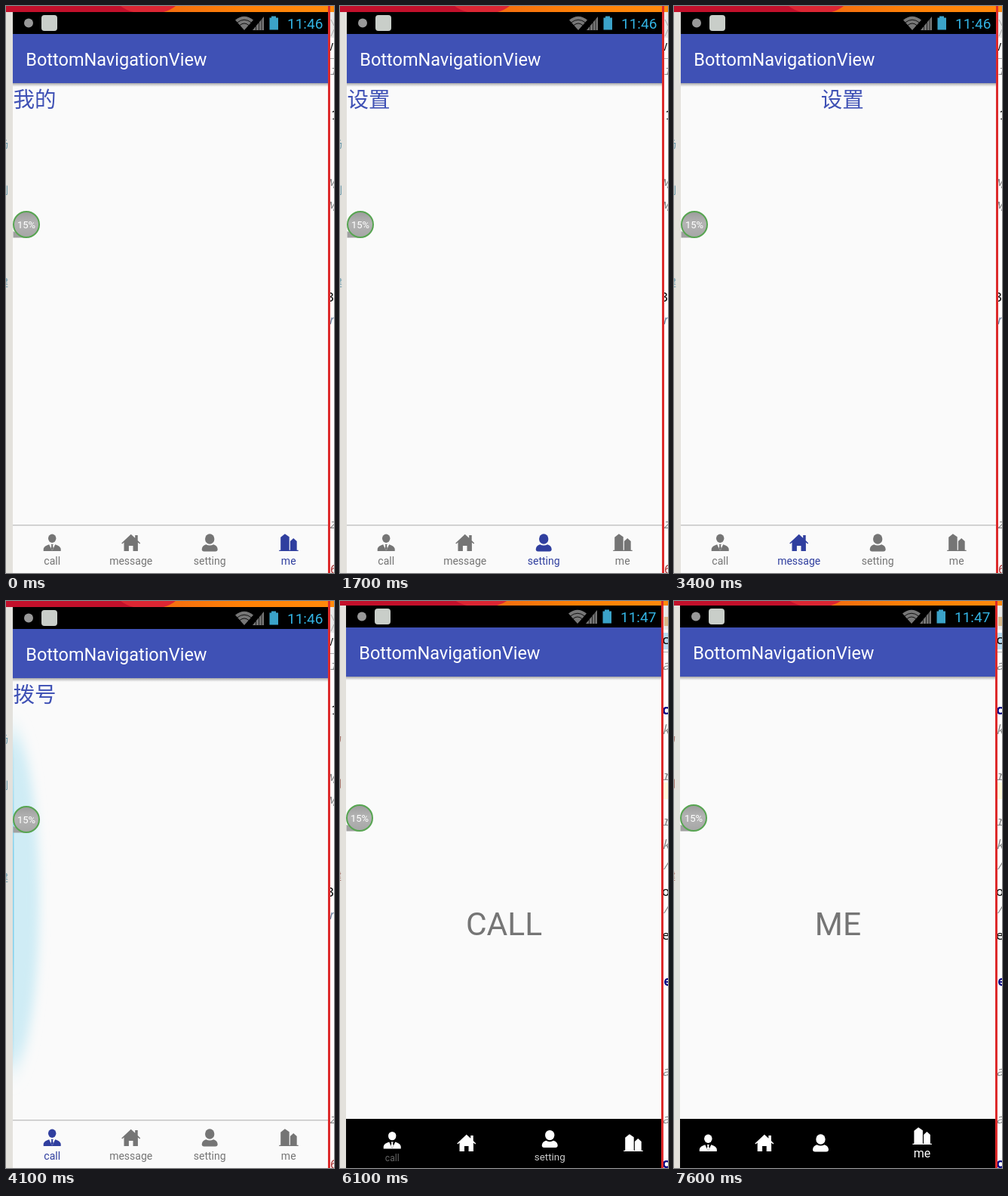
An HTML page that plays this animation: 435x750 px, repeating every 8300 ms.

```html
<!DOCTYPE html>
<html lang="zh-CN">
<head>
<meta charset="utf-8">
<title>Bottom navigation</title>
<style>
html, body { margin: 0; width: 100%; height: 100%; overflow: hidden; background: #fff; }
svg { display: block; width: 435px; height: 750px; }
text { font-family: Roboto, "Noto Sans", sans-serif; }
.page { font: 28.5px "Noto Sans CJK SC", "Noto Sans CJK", sans-serif; fill: #3f51b5; }
.mid { text-anchor: middle; }
.left text { font: 13px "Noto Sans CJK SC", "Noto Sans CJK", sans-serif; text-anchor: end; }
.code text { font: 17px "Noto Sans Mono", "DejaVu Sans Mono", monospace; }
.code .it { font-style: italic; fill: #8a8a8a; }
.code .kw { font-weight: bold; fill: #000080; }
</style>
</head>
<body>
<svg viewBox="0 0 435 750" xmlns="http://www.w3.org/2000/svg">
  <defs>
    <g id="call">
      <ellipse cy="-5.8" rx="5.2" ry="5.7"/>
      <path d="M-11.5 11V8Q-11 4.5-4 2.2L-.9 9 0 10 .9 9 4 2.2Q11 4.500 11.500 8V11Z"/>
      <path d="M-1.600 2h3.200l-.8 1.800.9 3.800L0 10-1.700 7.600-.8 3.800Z"/>
    </g>
    <path id="message" d="M-12.500 .5 0-11.300 5.500-6.200V-10H9V-2.900L12.500.5 11.500 1.500 9.200-.4V11H2.800V4H-2.800V11H-9.200V-.4L-11.500 1.500Z"/>
    <g id="setting">
      <ellipse cy="-5" rx="6.200" ry="6.700"/>
      <path d="M-7.500 11.500Q-10.500 11.500-10.500 8.500-10 3.500-5 2.200 0 5 5 2.200 10 3.500 10.500 8.500 10.500 11.500 7.500 11.500Z"/>
    </g>
    <path id="me" d="M-12.500 11V9.800H-10.500V-7.200L-4.800-11.700 1-7.700V9.800H2.200V-2L6.500-6 11-2V9.800H13V11Z"/>
    <linearGradient id="orange"><stop stop-color="#f26a12"/><stop offset=".5" stop-color="#ff8106"/><stop offset="1" stop-color="#ff8a0c"/></linearGradient>
    <linearGradient id="drop" x2="0" y2="1"><stop stop-color="#777" stop-opacity=".65"/><stop offset="1" stop-color="#999" stop-opacity="0"/></linearGradient>
    <linearGradient id="edge" x2="0" y2="1"><stop stop-color="#33b5e5" stop-opacity="0"/><stop offset=".35" stop-color="#33b5e5"/><stop offset=".65" stop-color="#33b5e5"/><stop offset="1" stop-color="#33b5e5" stop-opacity="0"/></linearGradient>
    <linearGradient id="ball" x2="0" y2="1"><stop stop-color="#9c9c9c"/><stop offset=".45" stop-color="#b4b4b4"/><stop offset="1" stop-color="#a6a6a6"/></linearGradient>
    <filter id="soft" x="-100%" y="-20%" width="300%" height="140%"><feGaussianBlur stdDeviation="7 16"/></filter>
    <clipPath id="body"><path d="M9 103H427V686H9Z"/></clipPath>
  </defs>

  <!-- desktop behind the phone, right side -->
  <g id="codeA" class="code">
    <path fill="#e9e9e9" d="M429 8h6v34h-6z"/>
    <path stroke="#aaa" d="M429 69.500h6M431 18l4 8M431 40l4-9"/>
    <text x="426" y="59" style="font-size:14px">Vi</text>
    <text x="429" y="91" class="it">i</text>
    <text x="431" y="150">1</text>
    <text x="426" y="241" class="it">M</text>
    <text x="426" y="271" class="it">M</text>
    <text x="425" y="391">3</text>
    <text x="428" y="421" class="it" style="fill:#6d83a0">n</text>
    <text x="428" y="691" class="it">z</text>
    <text x="430" y="751" style="fill:#a33">6</text>
  </g>
  <g id="codeB" class="code">
    <path fill="#e9e9e9" d="M428 6h7v32h-7z"/>
    <path fill="#d9b98a" d="M430 21h5v12h-5z"/>
    <path fill="#b9dcf2" d="M428 42h7v22h-7z"/>
    <path stroke="#aaa" d="M428 67.500h7"/>
    <path fill="#fffbdc" d="M428 240h7v22h-7z"/>
  </g>

  <g id="shell">
    <path fill="#e3e1dc" d="M-2 0H9V754H-2Z"/>
    <g id="leftText" class="left">
      <text x="3" y="187">扬</text><text x="3" y="248">别</text><text x="3" y="370">建</text>
    </g>
    <path fill="#c3102b" d="M-2 0H190V8H-2Z"/>
    <path fill="url(#orange)" d="M190 0H440V8H190Z"/>
    <path fill="#dc2633" d="M152 0H225Q219 5 209 8H169Q158 5 152 0Z"/>

    <path fill="#fafafa" d="M9 37H427V754H9Z"/>
    <path d="M9 8H427V37H9Z"/>
    <circle cx="30" cy="22.500" r="6" fill="#999"/>
    <rect x="47" y="12" width="21" height="21" rx="4" fill="#c9cec9"/>
    <g fill="#777">
      <path d="M304 18.500Q316 9 328 18.500L316 32Z"/>
      <path d="M327 32 342 14V32Z"/>
    </g>
    <g fill="none" stroke="#111">
      <path d="M306.500 22Q316 14.500 325.500 22M310 25.500Q316 20.500 322 25.500"/>
      <path d="M331.500 25v8M335.500 20v13M339 16v17" stroke-width=".8"/>
    </g>
    <path fill="#3ba3c9" d="M352 13.500h6v2h3V31.500H349.500V15.500H352Z"/>
    <text id="clock" x="373" y="29.500" font-size="19" fill="#33b5e5"></text>
    <path fill="#3f51b5" d="M9 37H427V102H9Z"/>
    <text x="26.300" y="79" font-size="23.500" fill="#fff">BottomNavigationView</text>

    <g id="pager" clip-path="url(#body)">
      <g id="glowR">
        <ellipse cx="431" cy="390" rx="29" ry="222" fill="#a4dcec" filter="url(#soft)"/>
        <path fill="url(#edge)" opacity=".75" d="M424.500 200H427V650H424.500Z"/>
      </g>
      <g id="glowL">
        <ellipse cx="8" cy="395" rx="36" ry="222" fill="#cfecf5" filter="url(#soft)"/>
        <path fill="url(#edge)" opacity=".5" d="M9 180H10.500V620H9Z"/>
      </g>
    </g>
    <path fill="url(#drop)" d="M9 102H427V107H9Z"/>
    <g id="bar">
      <path fill="#c6c6c6" d="M9 686H427V687.500H9Z"/>
    </g>

    <path fill="#a0a0a0" d="M9.500 306.500V298L29 305Q28 306.500 26 306.500Z"/>
    <circle cx="27" cy="289" r="17" fill="url(#ball)" stroke="#57a551" stroke-width="2"/>
    <text class="mid" x="27" y="293.700" font-size="13" fill="#fff">15%</text>
    <path fill="#dd2a2b" d="M427 0H430V754H427Z"/>
  </g>

  <g id="shift">
    <text id="big" class="mid" x="217.500" y="441.500" font-size="42.500" fill="#757575"></text>
    <path d="M8 685H426V750H8Z"/>
  </g>
</svg>

<script>
const LOOP = 8300, STEP = 100, PAGE = 418, SCENE_B = 4600;
const NAMES = ['call', 'message', 'setting', 'me'];
const TITLES = ['拨号', '消息', '设置', '我的'];
const NARROW = 74.6, WIDE = PAGE - 3 * NARROW;

// Each swipe: start time, from page, to page, progress per step.
const SWIPES = [
  [1000, 3, 2, [.05, .3, .646, .86, .933, .98, .995, 1]],
  [2000, 2, 3, [.06, .36, .74, .93, .99, 1]],
  [2900, 3, 2, [.05, .275, .78, 1]],
  [3300, 2, 1, [.048, .443, .85, .98]],
  [3700, 1, 0, [.08, .5, .9, 1]]
];
const GLOWS = {
  glowR: [2500, [.3, .7, 1, .6, .25]],
  glowL: [4000, [.5, 1, .75, .5, .3, .12]]
};
const TAPS = [[SCENE_B, 2], [6100, 0], [6700, 1], [7100, 2], [7500, 3]];

const $ = id => document.getElementById(id);

function add(parent, tag, attrs, text = '') {
  const el = document.createElementNS('http://www.w3.org/2000/svg', tag);
  set(el, attrs);
  el.textContent = text;
  parent.append(el);
  return el;
}
function set(el, attrs) {
  for (const key in attrs) el.setAttribute(key, attrs[key]);
}
const show = (el, on) => { el.style.display = on ? '' : 'none'; };

const pages = TITLES.map(s => add($('pager'), 'text', { class: 'page', y: 133.5 }, s));
const tabs = NAMES.map((name, i) => {
  const g = add($('bar'), 'g', { transform: `translate(${61.2 + i * 104.5} 710)` });
  add(g, 'use', { href: '#' + name });
  add(g, 'text', { class: 'mid', y: 28.5, 'font-size': 14 }, name);
  return g;
});
const items = NAMES.map(name => {
  const g = add($('shift'), 'g', { fill: '#fff' });
  add(g, 'use', { href: '#' + name });
  return { g, label: add(g, 'text', { class: 'mid', y: 28 }, name) };
});

// Code fragments peeking out beside the phone: glyph, baseline, class.
[['c', 57, ''], ['a', 91, 'it'], ['c', 150, 'kw'], ['k', 176, 'it'], ['r', 237, 'it'],
 ['r', 297, 'it'], ['k', 328, 'it'], ['/', 355, 'it'], ['o', 390, ''], ['/', 413, 'it'],
 ['e', 448, ''], ['le', 509, 'kw'], ['a', 628, 'it'], ['a', 691, 'it'], ['c', 750, 'kw']]
  .forEach(([s, y, c]) => add($('codeB'), 'text', { x: s === 'le' ? 419 : 427, y, class: c }, s));

function drawPager(t) {
  let pos = 3, tab = 3;
  for (const [start, from, to, curve] of SWIPES) {
    if (t < start) break;
    const f = curve[Math.min((t - start) / STEP, curve.length - 1)];
    pos = from + (to - from) * f;
    tab = f > .32 ? to : from;
  }
  pages.forEach((el, i) => set(el, { x: 9.5 + (i - pos) * PAGE }));
  tabs.forEach((el, i) => set(el, { fill: i === tab ? '#303f9f' : '#757575' }));
  for (const id in GLOWS) {
    const [start, curve] = GLOWS[id];
    set($(id), { opacity: curve[(t - start) / STEP] || 0 });
  }
}

function drawShift(t) {
  const n = TAPS.findLastIndex(([at]) => t >= at);
  const [at, now] = TAPS[n];
  const before = n ? TAPS[n - 1][1] : now;
  const k = t === at ? .4 : 1;
  let x = 8;
  items.forEach(({ g, label }, i) => {
    const a = (i === now) * k + (i === before) * (1 - k);
    const w = NARROW + (WIDE - NARROW) * a;
    set(g, { transform: `translate(${x + w / 2} ${717 - 9 * a})` });
    set(label, { 'font-size': 9.5 + 6.5 * a, opacity: Math.max(0, Math.min(1, 2 * a - .4)) });
    x += w;
  });
  $('big').textContent = NAMES[now].toUpperCase();
}

function draw(ms) {
  const t = Math.floor(ms % LOOP / STEP) * STEP;
  const second = t >= SCENE_B;
  set($('shell'), { transform: second ? 'translate(-1 -2)' : '' });
  $('clock').textContent = second ? '11:47' : '11:46';
  set($('leftText'), { fill: second ? '#a3685f' : '#5f93a8' });
  for (const id of ['codeA', 'pager', 'bar']) show($(id), !second);
  for (const id of ['codeB', 'shift']) show($(id), second);
  second ? drawShift(t) : drawPager(t);
}

const begin = performance.now();
function tick() {
  draw(performance.now() - begin);
  requestAnimationFrame(tick);
}
tick();
</script>
</body>
</html>
```
